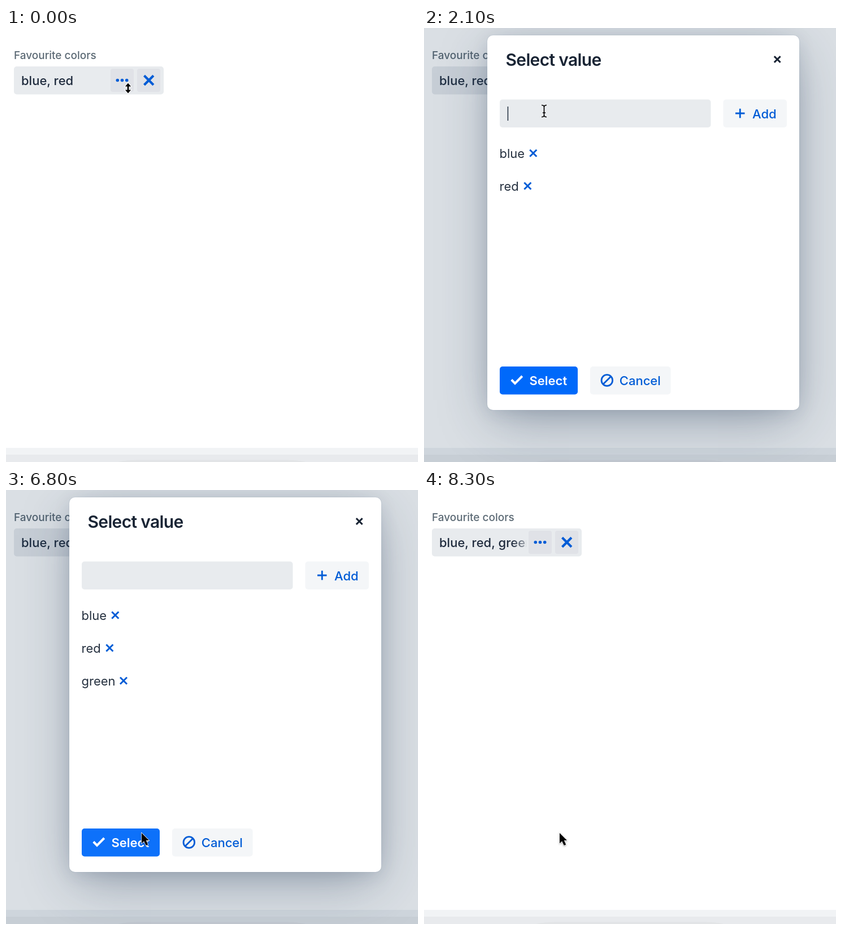
Recreate the animation shown at these times as an HTML page. Size 729 px wide and 768 px high, loop 8600 ms.

```html
<!DOCTYPE html>
<html lang="en">
<head>
<meta charset="utf-8">
<title>Select value dialog</title>
<style>
  html, body { margin: 0; width: 100%; height: 100%; overflow: hidden; background: #fff; }
  body { position: relative; }
  svg { position: absolute; left: 0; top: 0; width: 100%; height: 100%; overflow: visible; }
  text { font: 500 22px Inter, "Liberation Sans", sans-serif; font-optical-sizing: none; fill: #1f2b3d; white-space: pre; }
  .stage { width: 729px; height: 768px; }
  .label { font-size: 19px; fill: #5b6974; }
  .title { font-size: 30px; font-weight: 600; letter-spacing: -.022em; fill: #192434; }
  .item { font-weight: 400; fill: #25303f; }
  .link { fill: #005cd6; }
  .line { fill: none; stroke: #005cd6; }
  .field { fill: #e8ebee; }
  .soft { fill: #f4f6f8; }
  #backdrop { position: absolute; inset: 0; background: hsla(214, 53%, 23%, .16); }
  #dialog {
    position: absolute; left: 112px; top: 13px; width: 552px; height: 663px;
    border-radius: 10px; background: #fff;
    box-shadow: 0 0 0 1px hsla(214, 61%, 25%, .05),
      0 5px 33px -4px hsla(214, 53%, 23%, .16),
      0 25px 88px -11px hsla(214, 47%, 21%, .38);
  }
  #popup { filter: drop-shadow(0 2px 5px rgba(0, 0, 0, .28)); }
  #arrow { filter: drop-shadow(0 1.5px 1.5px rgba(0, 0, 0, .35)); }
</style>
</head>
<body>
<svg class="stage" viewBox="0 0 729 768">
  <defs>
    <linearGradient id="fade" gradientUnits="userSpaceOnUse" x1="156" x2="181" y1="0" y2="0">
      <stop stop-color="#1f2b3d"/>
      <stop offset=".96" stop-color="#1f2b3d" stop-opacity=".35"/>
      <stop offset="1" stop-color="#1f2b3d" stop-opacity="0"/>
    </linearGradient>
    <radialGradient id="rippleFill">
      <stop stop-color="#fff" stop-opacity=".22"/>
      <stop offset="1" stop-color="#fff" stop-opacity=".08"/>
    </radialGradient>
  </defs>
  <path fill="#f1f3f5" d="M0 743H729V756H0z"/>
  <path fill="#e8eaed" d="M0 755H729V768H0z"/>
  <path fill="#e2e4e6" d="M198 768Q212 764.5 230 764.5H500Q518 764.5 530 768z"/>
  <text class="label" x="14" y="55">Favourite colors</text>
  <rect class="field" x="14" y="68" width="265" height="49.5" rx="5"/>
  <text id="value" x="27" y="101" style="fill:url(#fade)"></text>
  <g fill="#e0e2e7">
    <rect x="185" y="72" width="41" height="41" rx="4"/>
    <rect x="232" y="72" width="41" height="41" rx="4"/>
  </g>
  <rect id="dotsHover" x="185" y="72" width="41" height="41" rx="4" fill="#1a3960" opacity=".05"/>
  <g class="link">
    <circle cx="197.3" cy="92.5" r="2.8"/><circle cx="205.5" cy="92.5" r="2.8"/><circle cx="213.7" cy="92.5" r="2.8"/>
  </g>
  <path class="line" stroke-width="4.2" d="M244.5 84.3l16.4 16.4m0-16.4l-16.4 16.4"/>
</svg>

<div id="backdrop"></div>
<div id="dialog">
  <svg viewBox="112 13 552 663">
    <text class="title" x="144.5" y="67">Select value</text>
    <path class="line" style="stroke:#192434" stroke-width="2.9" d="M619.8 50.1l10.8 10.8m0-10.8l-10.8 10.8"/>

    <rect class="field" x="134" y="126.5" width="373.5" height="49.5" rx="5"/>
    <text id="typed" x="147" y="160"></text>
    <rect id="caret" y="139" width="1.5" height="25" fill="#1f2b3d"/>

    <rect class="soft" x="529.5" y="126.5" width="112.5" height="49.5" rx="5"/>
    <rect id="addHover" x="529.5" y="126.5" width="112.5" height="49.5" rx="5" fill="#1a3960" opacity=".05"/>
    <path class="line" stroke-width="2.8" d="M551 151h16.5m-8.25-8.25v16.5"/>
    <text class="link" x="581" y="160">Add</text>

    <g id="list"></g>

    <rect x="134" y="599" width="138" height="49.5" rx="5" fill="#0069fa"/>
    <rect id="selectHover" x="134" y="599" width="138" height="49.5" rx="5" fill="#fff" opacity=".05"/>
    <rect id="ripple" x="134" y="599" width="138" height="49.5" rx="5" fill="url(#rippleFill)"/>
    <path class="line" style="stroke:#fff" stroke-width="4" d="M154.8 622.5l6.2 6.5L173.8 616"/>
    <text x="186.5" y="632" style="fill:#fff;font-weight:600">Select</text>

    <rect class="soft" x="294" y="599" width="142.5" height="49.5" rx="5"/>
    <path class="line" stroke-width="2.8" d="M314 623.5a9.8 9.8 0 1 1 19.6 0a9.8 9.8 0 1 1-19.6 0M317 630.2L330.6 616.8"/>
    <text class="link" x="345.8" y="632">Cancel</text>

    <g id="popup">
      <path fill="#fff" stroke="#b9bbbe" stroke-width=".8" d="M138 167H204a15.2 15.2 0 0 1 0 30.4H144a6 6 0 0 1-6-6z"/>
      <path fill="none" stroke="#d0d1d3" d="M188.5 167.5v29.5"/>
      <text x="146" y="188" style="font-size:17.5px;font-weight:400;fill:#000">free</text>
      <path fill="none" stroke="#777" stroke-width="1.7" d="M198.8 178l8.4 8.4m0-8.4l-8.4 8.4"/>
    </g>
  </svg>
</div>

<svg class="stage" viewBox="0 0 729 768">
  <g id="cursor">
    <path id="arrow" stroke="#fff" stroke-width="1.4" paint-order="stroke"
      d="M0 0V18.2L4.2 14.4L7.8 22L11.2 20.4L7.8 13H13z"/>
    <g id="resize">
      <path stroke="#fff" stroke-width="2" paint-order="stroke"
        d="M0-9L5.2-3H1.4V3H5.2L0 9L-5.2 3H-1.4V-3H-5.2z"/>
    </g>
    <g id="beam" fill="none">
      <path id="beamShape" stroke="#fff" stroke-width="3.4"
        d="M-4.5-10.5Q0-10.5 0-7Q0-10.5 4.5-10.5M0-7.5V7.5M-4.5 10.5Q0 10.5 0 7Q0 10.5 4.5 10.5M-2.6 3H2.6"/>
      <use href="#beamShape" style="stroke:#000"/>
    </g>
  </g>
</svg>

<script>
const LOOP = 8600, STEP = 100;
const el = id => document.getElementById(id);
const show = (id, on) => { el(id).style.display = on ? '' : 'none'; };
const progress = (t, start, end) => Math.min(1, Math.max(0, (t - start) / (end - start)));
const easeInOut = p => p * p * (3 - 2 * p);
const easeOut = p => 1 - (1 - p) ** 3;
const mix = (a, b, p) => a + (b - a) * p;

el('beamShape').removeAttribute('stroke');
el('beamShape').insertAdjacentHTML('beforebegin',
  '<use href="#beamShape" style="stroke:#fff;stroke-width:3.4"/>');
el('beamShape').setAttribute('stroke-width', 1.7);

// Each listed value: text, centre of its remove icon, baseline
el('list').innerHTML = [['blue', 193.3, 230], ['red', 183.4, 288], ['green', 208, 346]]
  .map(([name, x, y]) => `<g id="item-${name}"><text class="item" x="133.5" y="${y}">${name}</text>
    <path class="line" stroke-width="3" d="M${x - 6} ${y - 14.5}l12 12m0-12l-12 12"/></g>`).join('');

const keyTimes = [3300, 3600, 3900, 4000, 4500];
const moves = [
  // start, end, destination
  [0, 0, 216, 106.5],
  [100, 400, 214, 96],
  [1500, 2000, 212.5, 147],
  [4900, 5700, 591, 159],
  [6100, 6600, 240, 607],
];

function cursorAt(t) {
  let [, , x, y] = moves[0];
  for (const [start, end, toX, toY] of moves.slice(1)) {
    const p = easeInOut(progress(t, start, end));
    x = mix(x, toX, p);
    y = mix(y, toY, p);
  }
  return [x, y];
}

function drawCursor(t) {
  const [x, y] = cursorAt(t);
  const overInput = t > 1400 && t < 7200 && x > 134 && x < 507 && y > 127 && y < 176;
  const shape = t < 100 ? 'resize' : overInput || (t >= 7300 && t < 8300) ? 'beam' : 'arrow';
  for (const id of ['arrow', 'resize', 'beam']) show(id, id === shape);
  show('cursor', t < 3300 || t >= 4900);
  el('cursor').setAttribute('transform', `translate(${x} ${y})`);
}

function drawInput(t) {
  const count = keyTimes.filter(k => t >= k).length;
  el('typed').textContent = t < 6000 ? 'green'.slice(0, count) : '';
  const lastKey = Math.max(2100, ...keyTimes.filter(k => t >= k));
  const blinkOn = Math.floor((t - lastKey) / 500) % 2 === 0;
  show('caret', t >= 2100 && t < 5800 && blinkOn);
  const width = count ? el('typed').getComputedTextLength() : 0;
  el('caret').setAttribute('x', 147.7 + width);
  show('popup', t >= 4400 && t < 4600);
}

function drawDialog(t) {
  const enter = easeOut(progress(t, 640, 920));
  const exit = progress(t, 7284, 7450);
  const visible = enter > 0 && exit < 1;
  show('dialog', visible);
  show('backdrop', visible);
  el('dialog').style.opacity = enter * (1 - exit);
  el('dialog').style.transform = `scale(${mix(.95, 1, enter) + .02 * exit})`;
  el('backdrop').style.opacity = enter * (1 - progress(t, 7300, 7450));
}

function draw() {
  const t = Math.floor(performance.now() % LOOP / STEP) * STEP;
  drawDialog(t);
  drawInput(t);
  drawCursor(t);
  el('value').textContent = t < 7200 ? 'blue, red' : 'blue, red, green';
  show('dotsHover', t >= 200 && t < 700);
  show('addHover', t >= 5700 && t < 6300);
  show('selectHover', t >= 6600);
  show('ripple', t >= 7200);
  show('item-green', t >= 6000);
  requestAnimationFrame(draw);
}
draw();
</script>
</body>
</html>
```
